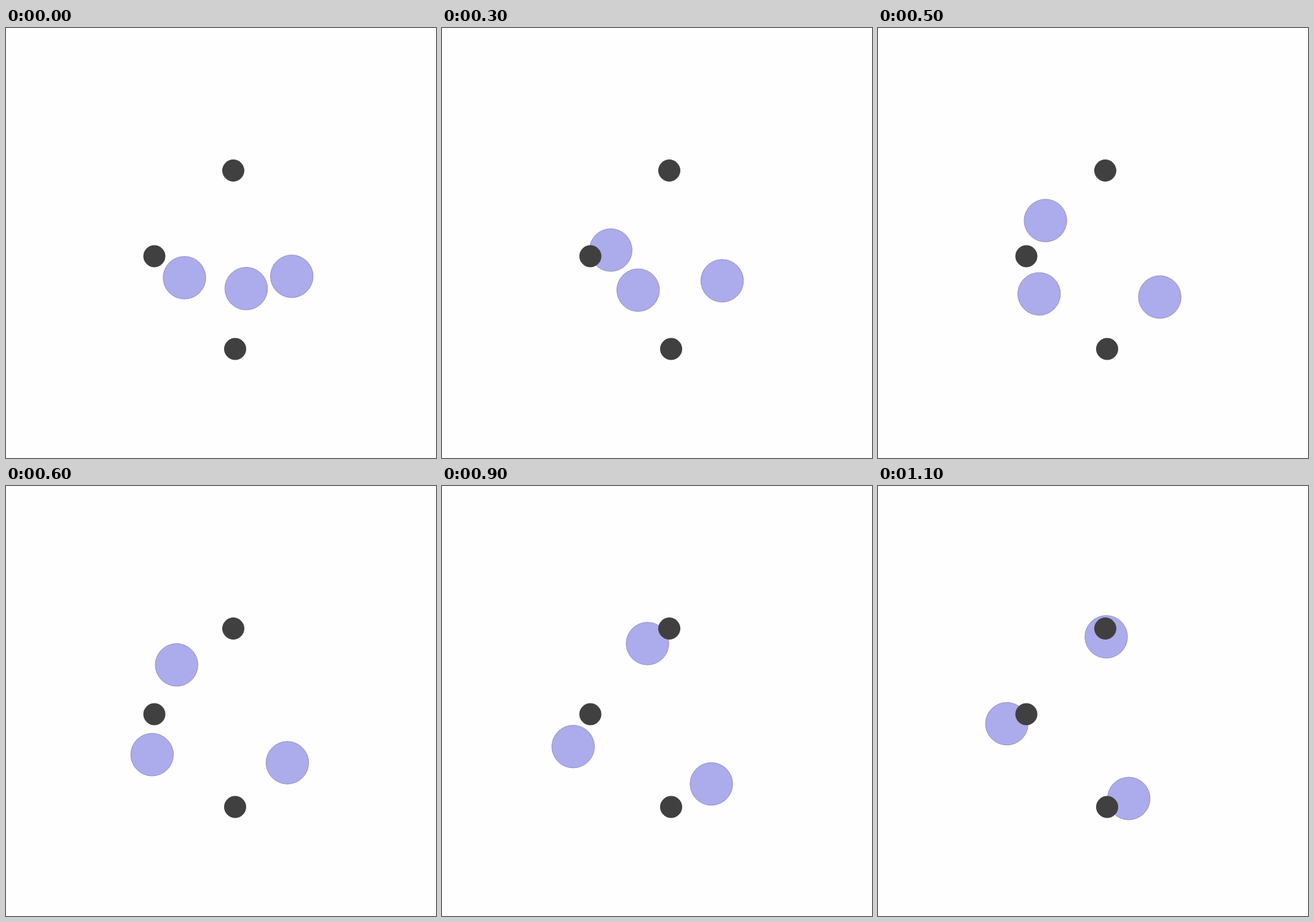
An HTML page with a canvas that plays this animation: 700x700 px, repeating every 1200 ms.

```html
<!DOCTYPE html>
<html>
<head>
<meta charset="utf-8">
<style>
html, body { margin: 0; width: 100%; height: 100%; overflow: hidden; background: #fefefe; }
canvas { display: block; }
</style>
</head>
<body>
<canvas id="stage" width="700" height="700"></canvas>
<script>
const ctx = document.getElementById('stage').getContext('2d');
const LOOP = 1200, STEP = 100;

const dots = [[370, 232], [241.5, 371.5], [373, 522.5]];

// Path points of the drifting discs, reached at these step numbers
const knots = [0, 2, 4, 6, 8, 9, 11];
const paths = [
  [[290.5, 406.5], [279, 382.2], [272.5, 338], [277.7, 291.2], [311.2, 265], [334.5, 256.5], [371.5, 245.5]],
  [[391, 424.2], [346.5, 426.5], [291, 427.8], [237.8, 437.3], [216.7, 434], [213.5, 424.2], [209.7, 387]],
  [[465.2, 404.2], [456, 401.8], [457.3, 424.7], [458, 450.5], [443, 467.3], [438.5, 485], [408.2, 508.7]]
];

// Slope of one coordinate at knot i
function slope(path, i, axis) {
  const a = Math.max(i - 1, 0), b = Math.min(i + 1, knots.length - 1);
  return (path[b][axis] - path[a][axis]) / (knots[b] - knots[a]);
}

// Cubic Hermite interpolation along a path
function pointAt(path, step) {
  let i = 0;
  while (i < knots.length - 2 && step >= knots[i + 1]) i++;
  const span = knots[i + 1] - knots[i], u = (step - knots[i]) / span;
  const blend = u * u * (3 - 2 * u);
  return [0, 1].map(axis =>
    path[i][axis] * (1 - blend) + path[i + 1][axis] * blend +
    span * u * (1 - u) * ((1 - u) * slope(path, i, axis) - u * slope(path, i + 1, axis)));
}

function disc([x, y], radius, fill, stroke) {
  ctx.beginPath();
  ctx.arc(x, y, radius, 0, 2 * Math.PI);
  ctx.fillStyle = fill;
  ctx.fill();
  ctx.strokeStyle = stroke;
  ctx.stroke();
}

function draw(now) {
  const step = Math.floor(now % LOOP / STEP);
  ctx.fillStyle = '#fefefe';
  ctx.fillRect(0, 0, 700, 700);
  for (const path of paths) disc(pointAt(path, step), 34.7, '#acabeb', '#9190c8');
  for (const dot of dots) disc(dot, 17.5, '#404040', '#404040');
}

const start = performance.now();
function tick() {
  draw(performance.now() - start);
  requestAnimationFrame(tick);
}
tick();
</script>
</body>
</html>
```
